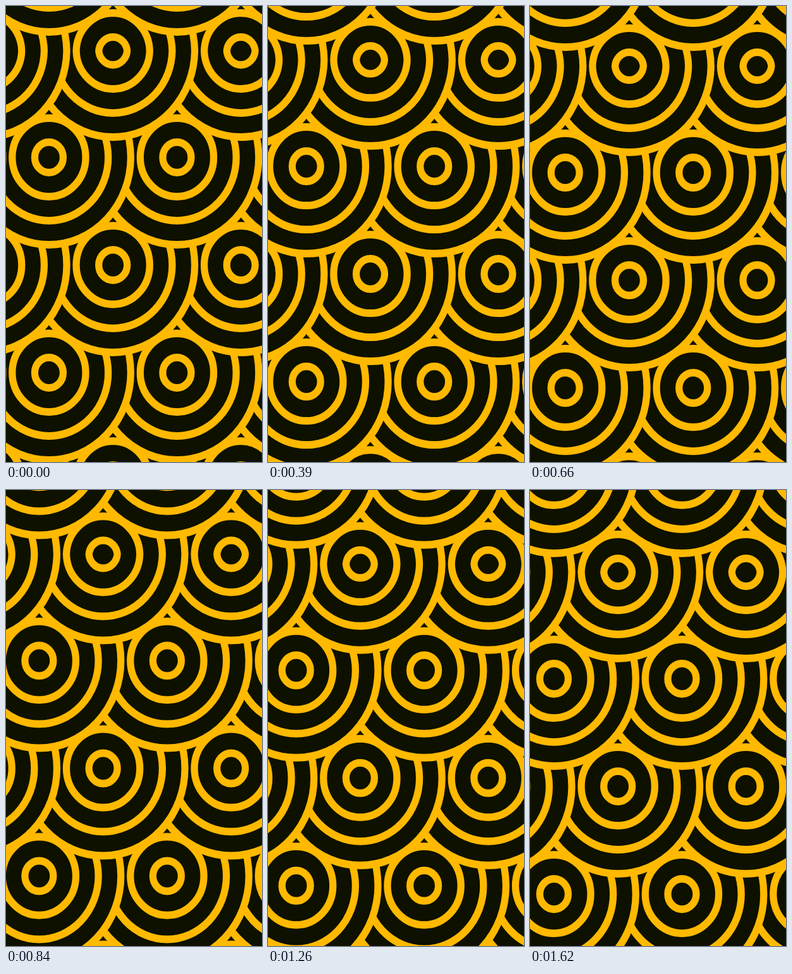
Write an HTML page with a canvas that moves like this. It is 405 px wide and 720 px high and loops after 1.65 s.

```html
<!DOCTYPE html>
<html lang="en">
<head>
<meta charset="utf-8">
<title>Drifting scales</title>
<style>
  html, body { margin: 0; width: 100%; height: 100%; overflow: hidden; background: #0e1100; }
  canvas { display: block; }
</style>
</head>
<body>
<canvas width="405" height="720"></canvas>
<script>
const W = 405, H = 720;
const LOOP = 1650, STEP = 30;
const COL = 202.5, ROW = 170;
const DARK = '#0e1100', GOLD = '#ffb900';
const ctx = document.querySelector('canvas').getContext('2d');

function disc(x, y) {
  ctx.save();
  ctx.translate(x, y);
  ctx.scale(0.9375, 1);
  for (let i = 3; i >= 0; i--) {
    ctx.beginPath();
    ctx.arc(0, 0, 24 + 38 * i, 0, 2 * Math.PI);
    if (i === 3) ctx.fill();
    ctx.stroke();
  }
  ctx.restore();
}

// Upper rows overlap lower ones; left discs overlap right ones.
function scales(x, y, top, bottom) {
  ctx.save();
  ctx.beginPath();
  ctx.rect(0, top, W, bottom - top);
  ctx.clip();
  for (let row = 5; row >= -2; row--)
    for (let col = 3; col >= -1; col--)
      disc(x + (col - Math.abs(row % 2) / 2) * COL, y + row * ROW);
  ctx.restore();
}

function draw(now) {
  const t = Math.floor((now % LOOP) / STEP) * STEP / 1620;
  const x = 169.2 - 30 * t, y = 68.9 + 59 * t;
  const seam = Math.round(y + 2);
  ctx.fillStyle = DARK;
  ctx.strokeStyle = GOLD;
  ctx.lineWidth = 12;
  // The tile seam swallows 4px, so everything above it sits lower.
  scales(x, y + 4, 0, seam);
  scales(x, y, seam, H);
}

const start = performance.now();
function tick() {
  draw(performance.now() - start);
  requestAnimationFrame(tick);
}
tick();
</script>
</body>
</html>
```
